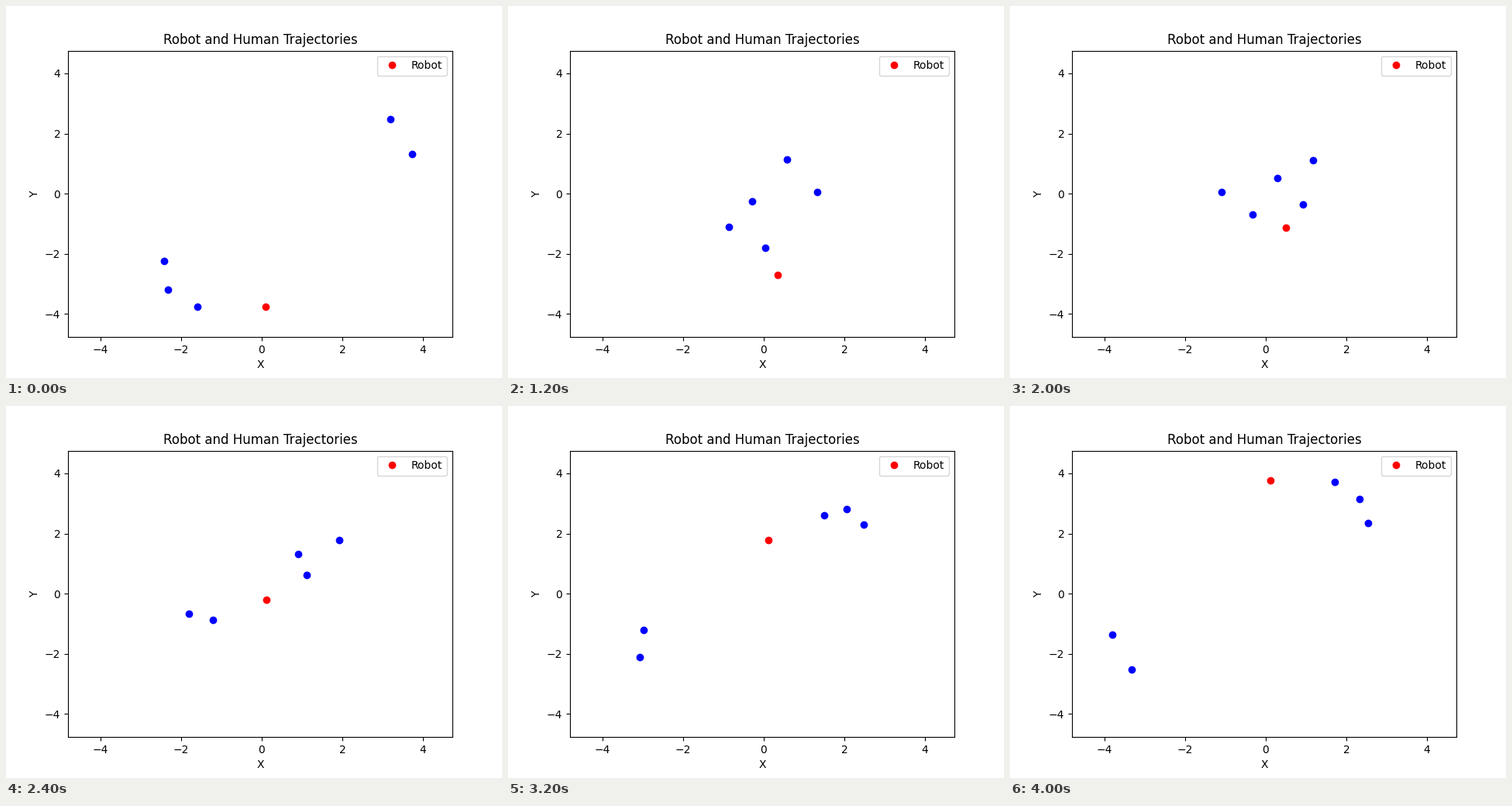
Write a matplotlib script that moves like this. It is 640x480 px and loops after 4.1 s.

```python
import numpy as np
import matplotlib.pyplot as plt
from matplotlib.animation import FuncAnimation

STEPS = 41
INTERVAL = 100                    # ms per frame
DT = 0.25                         # simulated seconds per frame
ORIGIN = np.array([330, 242.17])  # data origin on the stage, px
SCALE = np.array([52, -38.82])    # px per data unit


def to_data(points):
    return (np.array(points, float) - ORIGIN) / SCALE


def along(s, knots, points):
    """Points on a polyline at parameter s."""
    return np.column_stack([np.interp(s, knots, axis) for axis in points.T])


def walk(points, crowd=1, free=1, lag=0):
    """Walk a polyline at the crowd pace, the last leg at the free pace,
    and slow down within one unit of the goal."""
    pts = to_data(points)
    legs = np.hypot(*np.diff(pts, axis=0).T)
    knots = np.concatenate([[0], np.cumsum(legs)])
    gone = [-lag]
    for _ in range(STEPS - 1):
        pace = crowd if gone[-1] < knots[-2] else free
        gone.append(gone[-1] + DT * min(pace, knots[-1] - gone[-1]))
    return along(gone, knots, pts)


# Each human crosses the middle, sidestepping the others on the way.
humans = np.stack([
    walk([(496, 146), (360, 198), (273, 240), (183, 309), (155.4, 341.9)], lag=0.06),
    walk([(524, 191), (398, 241), (314, 269), (127.2, 295.7)], crowd=0.905, free=0.905),
    walk([(204, 329), (315, 252), (391, 199), (462.6, 150.8)], lag=0.085),
    walk([(209, 366), (239, 332), (345, 222), (452.5, 118.4)], lag=0.45),
    walk([(247, 388), (334, 311), (378, 256), (420.5, 92.5)], crowd=0.85),
])

# The robot waits for a gap, then drives straight up.
robot = along(np.arange(STEPS), [0, 6, 12, 20, 24, 40],
              to_data([(335, 388), (368, 362), (348, 347),
                       (356, 286), (336, 250), (336, 96)]))

fig, ax = plt.subplots(figsize=(6.4, 4.8), dpi=100)
(left, top), (right, bottom) = to_data([(80, 57.6), (576, 427.2)])
ax.set_xlim(left, right)
ax.set_ylim(bottom, top)
ax.set_xlabel("X")
ax.set_ylabel("Y")
ax.set_title("Robot and Human Trajectories")

human_dots, = ax.plot([], [], "bo")
robot_dot, = ax.plot([], [], "ro", label="Robot")
ax.legend(loc="upper right")


def update(i):
    human_dots.set_data(*humans[:, i].T)
    robot_dot.set_data(*robot[i:i + 1].T)
    return human_dots, robot_dot


anim = FuncAnimation(fig, update, frames=STEPS, interval=INTERVAL, repeat=True)
plt.show()
```
